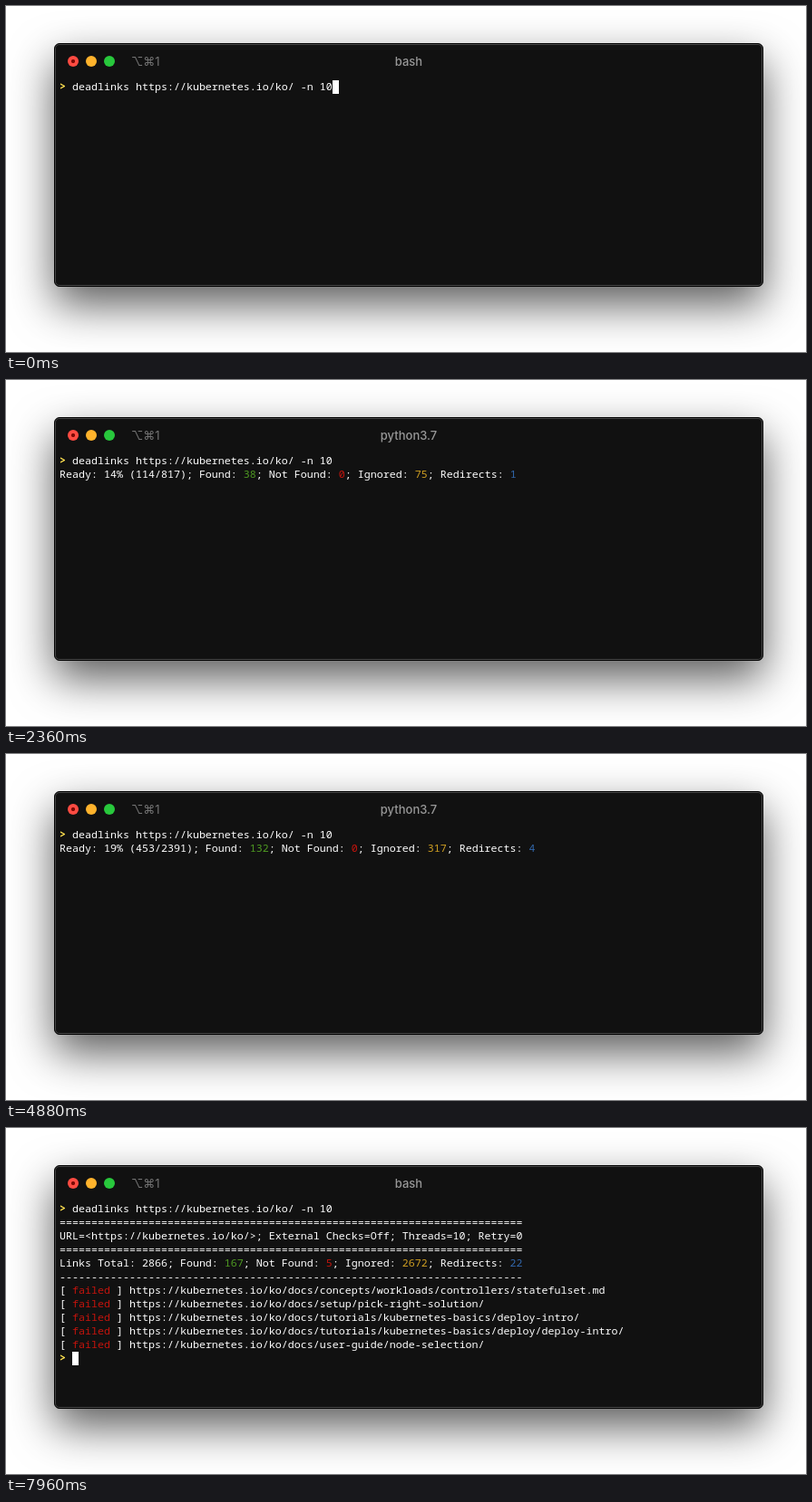
Recreate the animation shown at these times as an HTML page. Size 882x382 px, loop 8 s.

```html
<!DOCTYPE html>
<html lang="en">
<head>
<meta charset="utf-8">
<title>Terminal</title>
<style>
  html, body { margin: 0; width: 100%; height: 100%; overflow: hidden; background: #fff; }
  #stage { position: relative; width: 882px; height: 382px; overflow: hidden; }
  #window {
    position: absolute; left: 53px; top: 41px; width: 782px; height: 269px;
    box-sizing: border-box; border: 1px solid #000; border-radius: 6px; background: #111;
    box-shadow: inset 0 0 0 1px #484848, 0 20px 48px rgba(0, 0, 0, .64);
  }
  .light { position: absolute; top: 55px; width: 12px; height: 12px; border-radius: 50%; }
  .red { left: 68px; background: radial-gradient(circle, #7d0a05 1.7px, #ff4b42 2.5px); }
  .amber { left: 88px; background: #ffb32c; }
  .green { left: 108px; background: #28c83c; }
  .label {
    position: absolute; top: 51px; line-height: 20px; white-space: pre;
    font-family: Inter, "DejaVu Sans", sans-serif; font-size: 13px;
  }
  #keys { left: 138px; color: #747474; }
  #title { left: 344px; width: 200px; text-align: center; color: #989898; font-weight: 500; }
  #screen {
    position: absolute; left: 59px; top: 81px; color: #fff; white-space: pre;
    font: 11.6667px/15px "Noto Sans Mono", monospace;
  }
  #screen div { height: 15px; }
  #cursor { position: absolute; width: 7px; height: 15px; background: #fff; }
</style>
</head>
<body>
<div id="stage">
  <div id="window"></div>
  <i class="light red"></i><i class="light amber"></i><i class="light green"></i>
  <div class="label" id="keys">⌥⌘1</div>
  <div class="label" id="title"></div>
  <div id="screen"></div>
  <div id="cursor"></div>
</div>
<script>
const LOOP = 8000, STEP = 40;
const color = { prompt: '#ffe250', found: '#4f9a22', missing: '#c4140d', ignored: '#cf9f22', redirect: '#3268ad' };
const $ = id => document.getElementById(id);

// time, total, found, not found, ignored, redirects
const progress = [
  [680, 1, 0, 0, 0, 0],
  [1000, 60, 1, 0, 1, 0],
  [1240, 120, 2, 0, 9, 1],
  [1440, 223, 5, 0, 20, 1],
  [3200, 1360, 70, 0, 126, 2],
  [4880, 2391, 132, 0, 317, 4],
  [5480, 2740, 152, 1, 780, 7],
  [5800, 2817, 163, 4, 1713, 11],
  [6240, 2866, 167, 5, 2672, 22]
];

function countsAt(t) {
  const next = progress.findIndex(p => p[0] > t);
  if (next < 0) return progress[progress.length - 1].slice(1);
  const a = progress[next - 1], b = progress[next];
  const k = (t - a[0]) / (b[0] - a[0]);
  return a.slice(1).map((v, i) => Math.floor(v + (b[i + 1] - v) * k));
}

// A row is a list of plain strings and [text, color name] pairs.
const tallies = ([, found, missing, ignored, redirects]) => [
  '; Found: ', [found, 'found'], '; Not Found: ', [missing, 'missing'],
  '; Ignored: ', [ignored, 'ignored'], '; Redirects: ', [redirects, 'redirect']
];

function statusRow(counts) {
  const [total, ...rest] = counts;
  const done = rest.reduce((a, b) => a + b);
  return [`Ready: ${Math.round(done / total * 100)}% (${done}/${total})`, ...tallies(counts)];
}

const site = 'https://kubernetes.io/ko/';
const prompt = ['> ', 'prompt'];
const command = [prompt, `deadlinks ${site} -n 10`];
const rule = c => [c.repeat(73)];
const summary = [
  rule('='),
  [`URL=<${site}>; External Checks=Off; Threads=10; Retry=0`],
  rule('='),
  ['Links Total: 2866', ...tallies(countsAt(LOOP))],
  rule('-')
];
const failures = [
  'concepts/workloads/controllers/statefulset.md',
  'setup/pick-right-solution/',
  'tutorials/kubernetes-basics/deploy-intro/',
  'tutorials/kubernetes-basics/deploy/deploy-intro/',
  'user-guide/node-selection/'
].map(path => ['[ ', ['failed', 'missing'], ` ] ${site}docs/${path}`]);

// Rows below the command, and the cursor cell as [column, row].
function sceneAt(t) {
  if (t < 280) return { rows: [], cursor: [43, 0] };
  if (t < 680) return { rows: [], cursor: [0, 1] };
  if (t < 6320) return { rows: [statusRow(countsAt(t))] };
  if (t < 6360) return { rows: summary, cursor: [0, 6] };
  return { rows: [...summary, ...failures, [prompt]], cursor: [2, 11] };
}

function makeRow(parts) {
  const row = document.createElement('div');
  for (const part of parts) {
    if (typeof part === 'string') { row.append(part); continue; }
    const span = document.createElement('span');
    span.textContent = part[0];
    span.style.color = color[part[1]];
    if (part === prompt) span.style.fontWeight = 700;
    row.append(span);
  }
  return row;
}

function draw(t) {
  const { rows, cursor } = sceneAt(t);
  $('title').textContent = t >= 440 && t < 7200 ? 'python3.7' : 'bash';
  $('screen').replaceChildren(...[command, ...rows].map(makeRow));
  const style = $('cursor').style;
  style.display = cursor ? 'block' : 'none';
  if (cursor) {
    style.left = 59 + cursor[0] * 7 + 'px';
    style.top = 82 + cursor[1] * 15 + 'px';
  }
}

const start = performance.now();
let shown = -1;
function tick() {
  const t = Math.floor((performance.now() - start) % LOOP / STEP) * STEP;
  if (t !== shown) draw(shown = t);
  requestAnimationFrame(tick);
}
tick();
</script>
</body>
</html>
```
